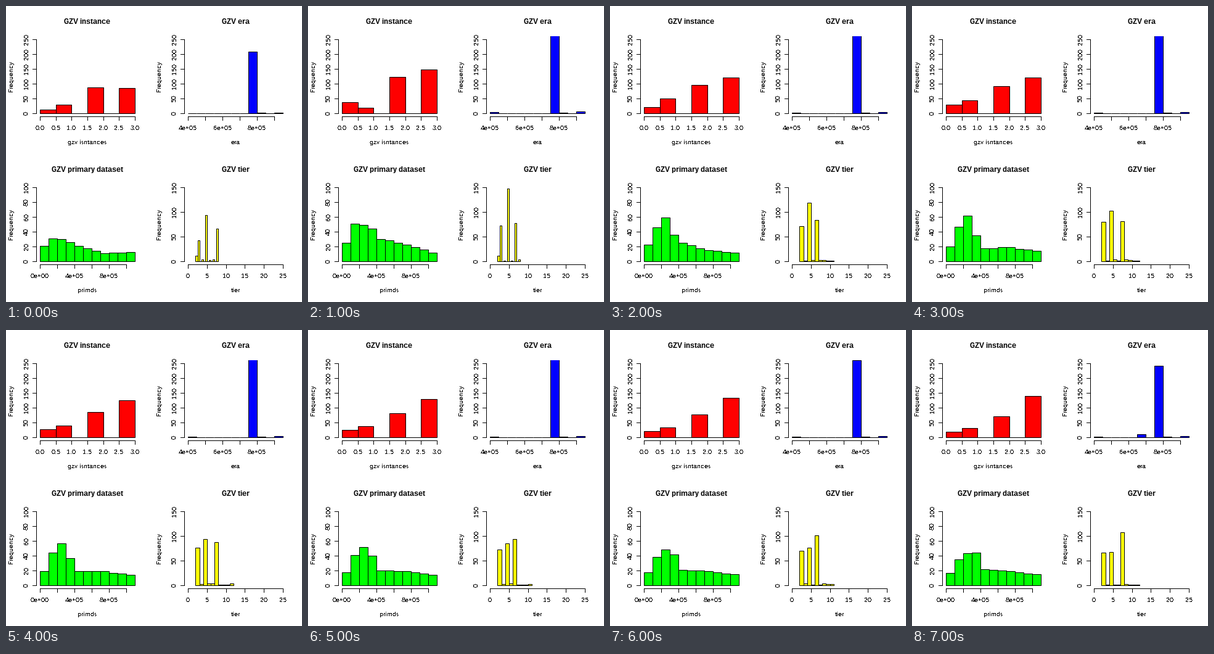
A matplotlib script that plays this animation: 480x480 px, repeating every 8000 ms.

```python
import random

import matplotlib.pyplot as plt
import numpy as np
from matplotlib.animation import FuncAnimation
from matplotlib.patches import Rectangle
from matplotlib.transforms import Bbox, TransformedBbox

SIZE, DPI = 480, 80
PT = 72 / DPI  # points per pixel
plt.rcParams.update({
    "font.family": "Liberation Sans",
    "text.hinting": "native",
    "text.hinting_factor": 1,
})

# Plot region inside each 240 px cell, and the data area within it.
LEFT, RIGHT, TOP, BOTTOM = 49, 215, 49, 179
X0, X1, Y0, Y1 = 55.14, 208.8, 174.2, 53.8

# Key steps, and the values the counts pass through there.
KEYS = [0, 1, 2, 3, 7]
TOTAL = [215, 326, 286, 285, 262]
INSTANCES = {
    0: [13, 37, 21, 30, 20],
    1: [29, 20, 50, 43, 31],
    3: [87, 122, 95, 91, 72],
}
PRIMARY = {
    0: [21, 25, 23, 20, 17],
    1: [31, 51, 46, 47, 35],
    2: [30, 49, 59, 62, 43],
    3: [26, 44, 36, 35, 44],
    4: [21, 30, 25, 18, 22],
    7: [11, 23, 15, 19, 19],
    10: [13, 12, 12, 14, 15],
}
TIER_PEAKS = [
    [42, 73, 71, 80, 66],
    [94, 147, 118, 103, 67],
    [66, 78, 84, 81, 108],
]

fig = plt.figure(figsize=(SIZE / DPI, SIZE / DPI), dpi=DPI, facecolor="white")
ax = fig.add_axes([0, 0, 1, 1])
ax.set(xlim=(0, SIZE), ylim=(SIZE, 0))
ax.axis("off")


def line(xs, ys):
    ax.plot(np.add(xs, 0.5), np.add(ys, 0.5), color="black", lw=PT,
            snap=False, solid_capstyle="projecting")


def label(x, y, text, size=10, smooth=False, **style):
    ax.text(x, y, text, fontsize=size * PT, ha="center", va="baseline",
            rotation_mode="anchor", antialiased=smooth, **style)


class Panel:
    def __init__(self, col, row, title, name, color, xlim, ymax):
        self.dx, self.dy = 240 * col, 240 * row
        self.color, self.xlim, self.ymax = color, xlim, ymax
        region = Bbox([[self.dx + LEFT, self.dy + TOP],
                       [self.dx + RIGHT, self.dy + BOTTOM + 1]])
        self.clip = TransformedBbox(region, ax.transData)
        self.bars = []
        mid = self.dx + (LEFT + RIGHT) / 2
        label(mid, self.dy + 29, title, 12.4, smooth=True, weight="bold")
        label(mid, self.dy + 224, name)
        label(self.dx + 11, self.dy + 114, "Frequency", rotation=90)

    def px(self, value):
        lo, hi = self.xlim
        return round(self.dx + X0 + (value - lo) / (hi - lo) * (X1 - X0))

    def py(self, value):
        return round(self.dy + Y0 + value / self.ymax * (Y1 - Y0))

    def axes(self, xticks, xlabels, ystep):
        base, side = self.dy + BOTTOM, self.dx + LEFT
        line([self.px(xticks[0]), self.px(xticks[-1])], [base, base])
        for value, text in zip(xticks, xlabels):
            x = self.px(value)
            line([x, x], [base, base + 6])
            label(x, self.dy + 201, text)
        line([side, side], [self.py(0), self.py(self.ymax)])
        for value in range(0, self.ymax + 1, ystep):
            y = self.py(value)
            line([side - 6, side], [y, y])
            label(self.dx + 36, y, str(value), rotation=90)

    def draw(self, counts, start, width):
        for bar in self.bars:
            bar.remove()
        self.bars = []
        base = self.py(0)
        for i, count in enumerate(counts):
            x0 = self.px(start + i * width)
            x1 = self.px(start + (i + 1) * width)
            bar = Rectangle((x0 + 0.5, base + 0.5), x1 - x0,
                            self.py(round(count)) - base, lw=PT, snap=False,
                            facecolor=self.color, edgecolor="black")
            ax.add_patch(bar)
            bar.set_clip_box(self.clip)
            self.bars.append(bar)


def sci(values):
    return [f"{v * 1e5:.0e}" if i % 2 == 0 else ""
            for i, v in enumerate(values)]


instance = Panel(0, 0, "GZV instance", "gzv isntances", "#ff0000", (0, 3), 250)
era = Panel(1, 0, "GZV era", "era", "#0000ff", (4, 9.5), 250)
primary = Panel(0, 1, "GZV primary dataset", "primds", "#00ff00", (0, 11), 100)
tier = Panel(1, 1, "GZV tier", "tier", "#ffff00", (0, 25), 150)

halves = np.arange(0, 3.1, 0.5)
instance.axes(halves, [f"{v:.1f}" for v in halves], 50)
era.axes(range(4, 10), sci(range(4, 10)), 50)
primary.axes(range(0, 11, 2), sci(range(0, 11, 2)), 20)
tier.axes(range(0, 26, 5), range(0, 26, 5), 50)


def at(step, values):
    return np.interp(step, KEYS, values)


def instance_counts(step, total):
    counts = np.zeros(6)
    for i, values in INSTANCES.items():
        counts[i] = at(step, values)
    counts[5] = total - counts.sum()
    return counts


def era_counts(step, total):
    counts = np.zeros(11)
    counts[10] = (total - 150) / 25
    counts[0] = counts[10] / 2
    counts[8] = 2
    counts[5] = np.interp(step, [6, 7], [0, 11])
    counts[7] = total - counts.sum()
    return counts


def primary_counts(step):
    knots = [at(step, values) for values in PRIMARY.values()]
    return np.interp(range(11), list(PRIMARY), knots)


def tier_counts(step, narrow):
    """Counts of the whole values from 3 up: three peaks among small rests."""
    rng = random.Random(step)
    third = 8 if step % 4 in (0, 3) else 7
    last = 8 if narrow else third + 4
    counts = [rng.randint(1, 4) for _ in range(3, last + 1)]
    for value, heights in zip((3, 5, third), TIER_PEAKS):
        counts[value - 3] = at(step, heights)
    if not narrow:
        return counts
    spread = np.zeros(2 * len(counts))
    spread[1::2] = counts
    spread[0] = 12
    return spread


def update(step):
    total = at(step, TOTAL)
    narrow = step < 2
    instance.draw(instance_counts(step, total), 0, 0.5)
    era.draw(era_counts(step, total), 4, 0.5)
    primary.draw(primary_counts(step), 0, 1)
    tier.draw(tier_counts(step, narrow), 2, 0.5 if narrow else 1)
    return []


anim = FuncAnimation(fig, update, frames=8, init_func=lambda: [],
                     interval=1000, repeat=True, repeat_delay=0)
plt.show()
```
